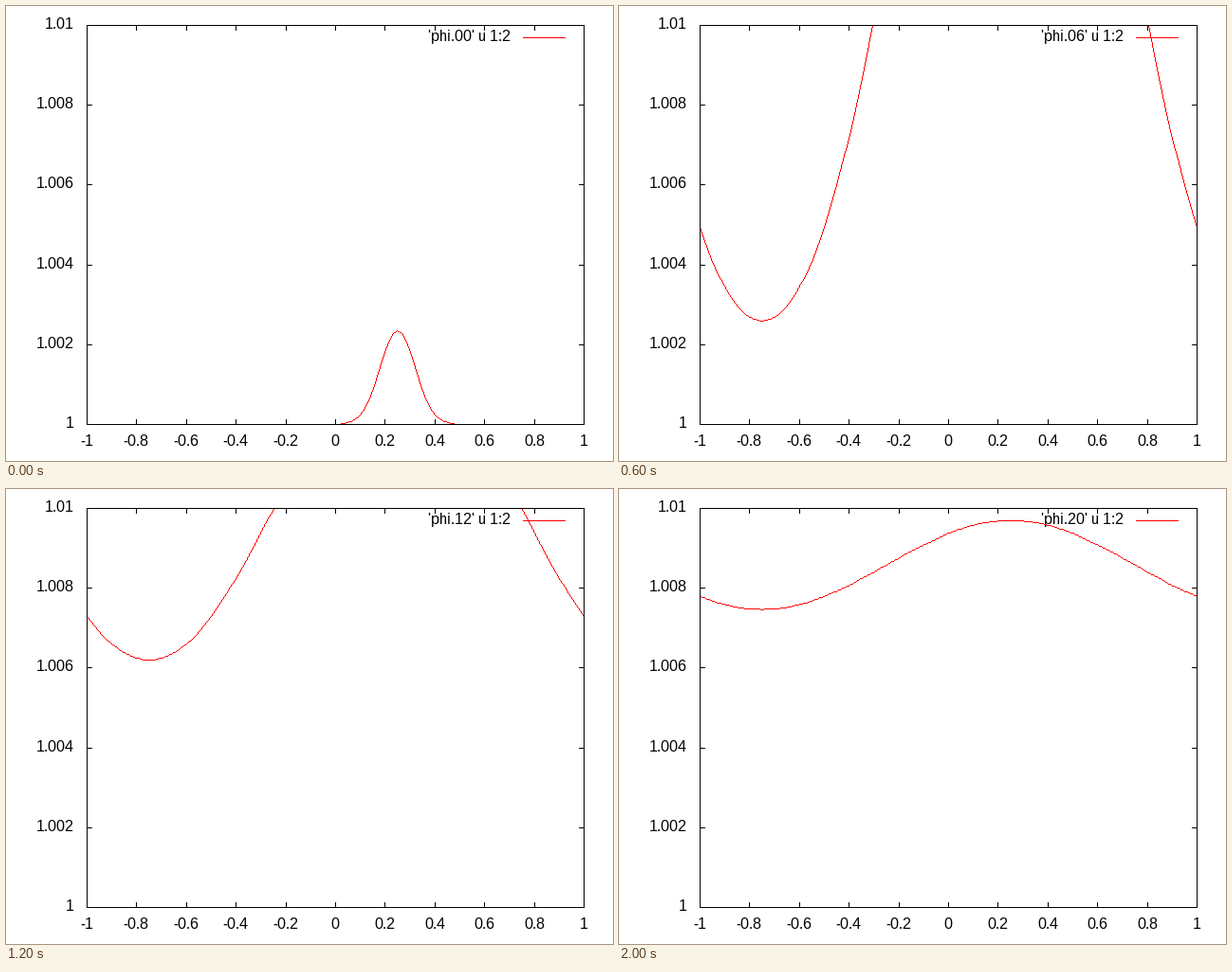
Write a matplotlib script that moves like this. It is 640 by 480 pixels and loops after 2600 ms.

```python
import numpy as np
import matplotlib.pyplot as plt
from matplotlib.animation import FuncAnimation

W, H, DPI = 640, 480, 100
LEFT, RIGHT, TOP, BOTTOM = 85, 609, 20, 441
TICK = 5
STEPS, FRAMES = 20, 26          # the last step is held
PX = 72 / DPI                   # one pixel in points
RED = (255, 0, 0, 255)

plt.rcParams["font.family"] = "Liberation Sans"
plt.rcParams["text.hinting"] = "native"     # thin one pixel stems
plt.rcParams["text.hinting_factor"] = 1
fig = plt.figure(figsize=(W / DPI, H / DPI), dpi=DPI, facecolor="white")
ax = fig.add_axes([0, 0, 1, 1])


def px_x(x):
    return LEFT + (x + 1) / 2 * (RIGHT - LEFT)


def px_y(phi):
    return BOTTOM - (phi - 1) / 0.01 * (BOTTOM - TOP)


def line(xs, ys, color="black", z=4):
    """Crisp one pixel line through pixel centres."""
    ax.plot(np.add(xs, 0.5), np.add(ys, 0.5), color=color, lw=PX,
            solid_capstyle="projecting", snap=False, zorder=z)


def label(x, y, s, ha):
    return ax.text(x, y, s, ha=ha, va="baseline", size=16 * PX,
                   color="black", zorder=2)


def theta(d, s):
    """Periodic heat kernel on a domain of length 2."""
    n = np.arange(1, 40)
    modes = np.exp(-(np.pi * n) ** 2 * s) * np.cos(np.pi * np.multiply.outer(d, n))
    return 1 + 2 * modes.sum(axis=-1)


def phi(x, step):
    """Cut through a spreading 2D Gaussian blob, just beside its centre."""
    s = 0.0025 + 0.01373 * step
    mean = np.pi * 0.01 / 4
    return 1 + mean * theta(x - 0.25, s) * theta(0.25 - 1 / 256, s)


def plot_pixels(xs, ys):
    """Aliased polyline, clipped to the inside of the border."""
    img = np.zeros((H, W, 4), np.uint8)
    pts = np.rint(np.column_stack([xs, ys])).astype(int)
    for a, b in zip(pts[:-1], pts[1:]):
        n = max(abs(b - a)) + 1
        x, y = np.rint(np.linspace(a, b, n)).astype(int).T
        inside = (x > LEFT) & (x < RIGHT) & (y >= TOP) & (y < BOTTOM)
        img[y[inside], x[inside]] = RED
    return img


# border, ticks and tick labels
line([LEFT, RIGHT, RIGHT, LEFT, LEFT], [TOP, TOP, BOTTOM, BOTTOM, TOP])
for i in range(11):
    v = (i - 5) / 5
    x = round(px_x(v))
    line([x, x], [BOTTOM, BOTTOM - TICK])
    line([x, x], [TOP, TOP + TICK])
    label(x, 464, f"{v:g}", "center")
for i in range(6):
    v = 1 + 0.002 * i
    y = round(px_y(v))
    line([LEFT, LEFT + TICK], [y, y])
    line([RIGHT, RIGHT - TICK], [y, y])
    label(71.5, y + 4, f"{v:g}", "right")

# key
key = label(532, 37, "", "right")
line([545, 589], [33, 33], color="red", z=2)

# curve
grid = np.linspace(-1, 1, 129)
curve = ax.imshow(np.zeros((H, W, 4), np.uint8), extent=(0, W, H, 0),
                  aspect="auto", interpolation="nearest", zorder=3)
ax.set_xlim(0, W)
ax.set_ylim(H, 0)
ax.axis("off")


def update(i):
    step = min(i, STEPS)
    curve.set_data(plot_pixels(px_x(grid), px_y(phi(grid, step))))
    key.set_text(f"'phi.{step:02d}' u 1:2")
    return curve, key


anim = FuncAnimation(fig, update, frames=FRAMES, interval=100,
                     repeat=True, repeat_delay=0, blit=False)
plt.show()
```
